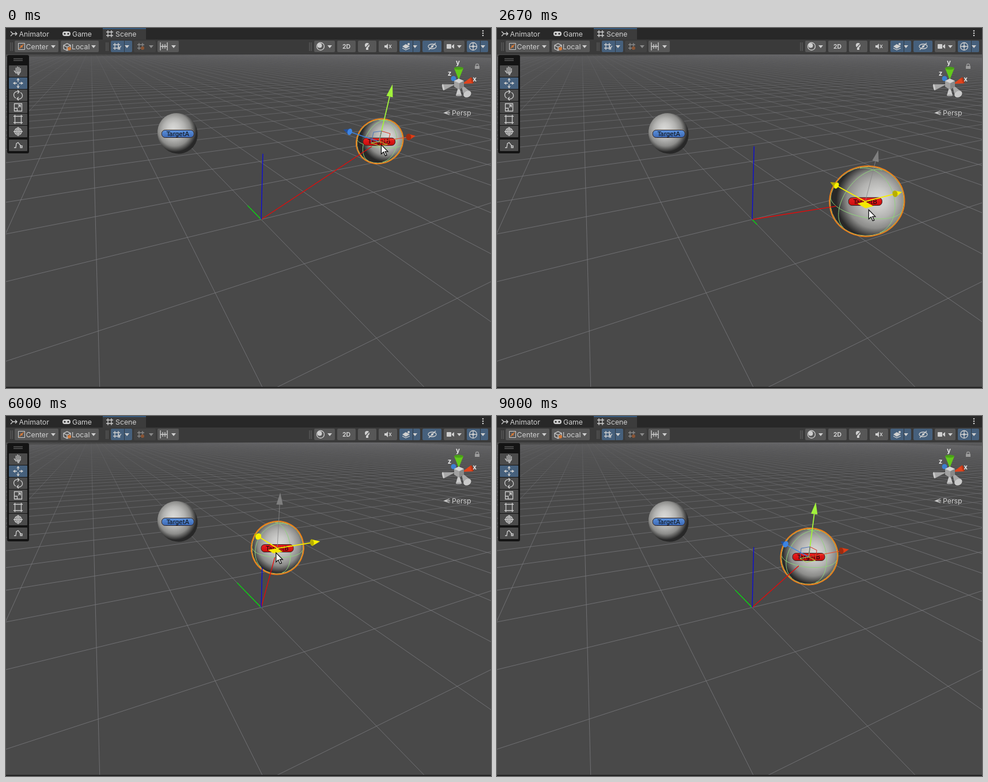
An HTML page with a canvas that plays this animation: 842x626 px, repeating every 9190 ms.

```html
<!DOCTYPE html>
<html lang="en">
<head>
<meta charset="utf-8">
<title>Scene view</title>
<style>
html, body { margin: 0; width: 100%; height: 100%; overflow: hidden; background: #494949; }
canvas { display: block; }
</style>
</head>
<body>
<canvas id="stage" width="842" height="626"></canvas>
<script>
const W = 842, H = 626, LOOP = 9190, STEP = 200 / 3, TAU = Math.PI * 2;
const INK = '#cfcfcf', DIM = '#8a8a8a', BTN = '#575757', ON = '#46607c';
const stage = document.getElementById('stage').getContext('2d');
let g = stage;

// ---------- drawing helpers ----------
function paint(fill, stroke, width = 1) {
  if (fill) { g.fillStyle = fill; g.fill(); }
  if (stroke) { g.strokeStyle = stroke; g.lineWidth = width; g.stroke(); }
}
function poly(pts, fill, stroke, width) {
  g.beginPath();
  pts.forEach(p => g.lineTo(...p));
  if (pts.length > 2) g.closePath();
  paint(fill, stroke, width);
}
const line = (a, b, color, width) => poly([a, b], null, color, width);
function box(x, y, w, h, fill, r = 0, stroke) {
  g.beginPath(); g.roundRect(x, y, w, h, r); paint(fill, stroke);
}
function oval(x, y, rx, ry, turn, fill, stroke, width) {
  g.beginPath(); g.ellipse(x, y, rx, ry, turn, 0, TAU); paint(fill, stroke, width);
}
const disc = (x, y, r, fill, stroke, width) => oval(x, y, r, r, 0, fill, stroke, width);
function text(s, x, y, color = INK, font = '12.3px Inter, sans-serif', align = 'left') {
  g.font = font; g.textAlign = align; g.fillStyle = color; g.fillText(s, x, y);
}
// path drawn around a centre
function icon(x, y, d, color = INK, solid = false) {
  g.save(); g.translate(x, y);
  const p = new Path2D(d);
  g.fillStyle = g.strokeStyle = color; g.lineWidth = 1.3;
  if (solid) g.fill(p); else g.stroke(p);
  g.restore();
}
// cone with the flat end at a and the point at b; open is the roundness of the visible base
function cone(a, b, r, side, base, open) {
  const turn = Math.atan2(b[1] - a[1], b[0] - a[0]), nx = -Math.sin(turn) * r, ny = Math.cos(turn) * r;
  poly([[a[0] + nx, a[1] + ny], b, [a[0] - nx, a[1] - ny]], side);
  if (open > 0) oval(a[0], a[1], r * open, r, turn, base);
}

// ---------- camera ----------
const CAM = [-1.54, 1.99, -2.9], MID = [421, 336], FOCAL = 502;
const depth = (x, y, z) => 1 + .095 * x - .134 * y + .202 * z;
function proj(x, y, z) {
  const w = depth(x, y, z);
  return [(443 + 157.9 * x - 56.5 * y + 29.8 * z) / w, (333 + 3.4 * x - 156 * y + 5.8 * z) / w];
}
// screen point to ground point
function ground(u, v) {
  const a = 157.9 - .095 * u, b = 29.8 - .202 * u, c = 3.4 - .095 * v, d = 5.8 - .202 * v;
  const e = u - 443, f = v - 333, det = a * d - b * c;
  return [(e * d - b * f) / det, (a * f - c * e) / det];
}

// ---------- motion: almost steady turns round an ellipse (ms, degrees, radius) ----------
const TURNS = [
  [600, 50, 1.62], [1470, 197, .77], [1933, 264.6, .81], [2400, 341, .98], [3600, 482, 1.12], [4270, 573.6, .98],
  [4933, 655.5, .99], [5200, 700, .98], [6000, 804.7, .937], [7070, 980.4, .946], [7533, 1048.4, .78], [8270, 1139.5, .917]
];
function slope(i, k) {
  const p = TURNS[i - 1], n = TURNS[i + 1];
  return p && n ? (n[k] - p[k]) / (n[0] - p[0]) : 0;
}
function position(time) {
  const last = TURNS.length - 1, t = Math.max(TURNS[0][0], Math.min(TURNS[last][0], time));
  let i = 0;
  while (i < last - 1 && t >= TURNS[i + 1][0]) i++;
  const a = TURNS[i], b = TURNS[i + 1], d = b[0] - a[0], s = (t - a[0]) / d;
  const [deg, r] = [1, 2].map(k =>
    a[k] * (1 + 2 * s) * (1 - s) ** 2 + b[k] * s * s * (3 - 2 * s) +
    d * s * (1 - s) * (slope(i, k) * (1 - s) - slope(i + 1, k) * s));
  const angle = deg * TAU / 360;
  return [455 + 185 * r * Math.cos(angle), 328 - 105 * r * Math.sin(angle)];
}

// ---------- scene objects ----------
function sphere(x, z, selected) {
  const w = depth(x, 0, z), [u, v] = proj(x, 0, z);
  const du = u - MID[0], dv = v - MID[1], k = .13 / w;
  const cx = u + du * k * k, cy = v + dv * k * k, turn = Math.atan2(dv, du);
  const r = 67 / w, long = r * (1 + .35 * (du * du + dv * dv) / FOCAL ** 2);
  const lit = g.createRadialGradient(u + du * k, v + dv * k, 0, u + du * k * .6, v + dv * k * .6, r * 1.1);
  ['#d8d8d6', '#cbcbc9', '#b3b3b1', '#8c8c8a', '#282828'].forEach((c, i) => lit.addColorStop(i / 4, c));
  oval(cx, cy, long, r, turn, lit);
  if (selected) {
    wires(x, z);
    oval(cx, cy, long, r, turn, null, '#b4c46c');
    oval(cx, cy, long + 1.2, r + 1.2, turn, null, '#f08018', 1.9);
  }
}
function wires(x, z) {
  const toCam = [CAM[0] - x, CAM[1], CAM[2] - z];
  for (let axis = 0; axis < 3; axis++) {
    let down = false;
    g.beginPath();
    for (let i = 0; i <= 90; i++) {
      const a = i * TAU / 90, p = [0, 0, 0];
      p[(axis + 1) % 3] = .5 * Math.cos(a);
      p[(axis + 2) % 3] = .5 * Math.sin(a);
      const front = p[0] * toCam[0] + p[1] * toCam[1] + p[2] * toCam[2] > .25;
      const q = proj(x + p[0], p[1], z + p[2]);
      if (front && down) g.lineTo(...q); else g.moveTo(...q);
      down = front;
    }
    paint(null, '#8fd47c');
  }
}
function label(name, x, z, top, bottom) {
  const [u, v] = proj(x, 0, z), w = Math.max(56, 65 / depth(x, 0, z)), h = w / 3 - 5.7;
  const fill = g.createLinearGradient(0, v - h / 2, 0, v + h / 2);
  fill.addColorStop(0, top); fill.addColorStop(1, bottom);
  box(u - w / 2, v - h / 2, w, h, fill, Math.min(6, h / 2), '#2c2020');
  const size = w * .245 - 3.3;
  text(name, u, v + size * .36, '#0a0a0a', size + 'px "DejaVu Sans", sans-serif', 'center');
}
function vectors(x, z) {
  const len = Math.hypot(x, z), end = Math.max(0, 1 - .5 / len), o = proj(0, 0, 0);
  line(o, proj(x * end, 0, z * end), '#e80808', 1.3);
  line(o, proj(0, 0, z / len), '#00e408', 1.3);
  line(o, proj(0, x / len, 0), '#0808e0', 1.3);
}
function arrow(x, z, axis, color, side, base, width) {
  const size = depth(x, 0, z) * .7, from = [x, 0, z];
  const at = s => from.map((c, i) => c + axis[i] * size * s);
  const a = at(.8), view = a.map((c, i) => c - CAM[i]);
  const open = view.reduce((sum, c, i) => sum + c * axis[i], 0) / Math.hypot(...view);
  line(proj(...from), proj(...a), color, width);
  cone(proj(...a), proj(...at(1)), 5.7, side, base, open);
}
function handles(x, z, mode) {
  const drag = mode === 'drag', s = depth(x, 0, z) * .14, gray = 'rgba(136,136,136,.85)';
  const quad = (p, q) => [[0, 0], [1, 0], [1, 1], [0, 1]].map(([i, j]) =>
    proj(x + s * (i * p[0] + j * q[0]), s * (i * p[1] + j * q[1]), z + s * (i * p[2] + j * q[2])));
  const left = [-1, 0, 0], up = [0, 1, 0], near = [0, 0, -1];
  if (drag) {
    arrow(x, z, [0, 1, 0], gray, gray, gray, 1);
    arrow(x, z, [0, 0, 1], '#f8f000', '#b8ae00', '#f8f000', 1.8);
    arrow(x, z, [1, 0, 0], '#f8f000', '#f8f000', '#b8ae00', 1.8);
  } else {
    arrow(x, z, [0, 0, 1], '#3d84e2', '#24509a', '#3d84e2', 1.4);
    arrow(x, z, [1, 0, 0], '#e8502c', '#e03c14', '#9c2c10', 1.2);
    arrow(x, z, [0, 1, 0], '#a2f23c', '#a2f23c', '#70b020', 1.8);
    poly(quad(near, up), null, '#d8321c');
    poly(quad(left, up), null, '#4a74b8');
  }
  if (mode === 'idle') poly(quad(left, near), null, '#a8d838');
  else poly(quad(left, near), '#f5e800');
}
function pointer(x, y) {
  const arrowhead = 'M0 0V16L4 12.5 7 19 9.6 18 6.6 11.7H11.5Z';
  icon(x, y, arrowhead, '#fff', true);
  icon(x, y, arrowhead, '#111');
}

// ---------- fixed picture ----------
function floorGrid() {
  const fade = g.createLinearGradient(0, 40, 0, 300);
  ['.08', '.4', '.55', '.7', '.75'].forEach((a, i) => fade.addColorStop(i / 4, `rgba(124,124,128,${a})`));
  for (let i = -70; i <= 70; i++) {
    line(proj(i, 0, (-.8 - .095 * i) / .202), proj(i, 0, 400), fade);
    line(proj((-.8 - .202 * i) / .095, 0, i), proj(800, 0, i), fade);
  }
}
const caret = (x, color = INK) => icon(x, 32, 'M-4-2H4L0 3Z', color, true);
const HASH = 'M-3-6V6M3-6V6M-6-3H6M-6 3H6';

function button(x, w, color, menu) {
  box(x, 22, w, 20, color, 2);
  if (menu) caret(x + w - 9);
}
function topBars() {
  box(0, 0, W, 20, '#282828');
  box(0, 20, W, 26, '#3a3a3a');
  box(168, 0, 75, 20, '#3c3c3c');
  box(168, 0, 75, 2, '#35587c');
  icon(13, 10, 'M-5-4L-1 0H5M-5 4L-1 0M3-3L6 0 3 3');
  text('Animator', 22.5, 15);
  box(98, 6, 14, 8, INK, 4);
  disc(102, 10, 1.6, '#282828'); disc(108, 10, 1.6, '#282828');
  text('Game', 115, 15);
  icon(180, 10, HASH);
  text('Scene', 190, 15);
  for (let y = 5; y < 14; y += 4) disc(828, y, 1.3, INK);
  [9, 175, 528].forEach(x => icon(x, 32, 'M-1-7V8M2-7V8', '#5c5c5c'));

  button(15, 76, BTN, true);
  box(21.5, 26.5, 11, 11, null, 0, INK); icon(27, 32, 'M-4 4L4-4', '#d07838'); disc(27, 32, 2, '#d07838');
  text('Center', 34.5, 36.5);
  button(95, 66, BTN, true);
  icon(106, 33, 'M-6-3L0-6 6-3V3L0 6-6 3ZM-6-3L0 0 6-3M0 0V6'); disc(110, 36, 3, '#d07838');
  text('Local', 114, 36.5);
  button(182, 37, ON, true); icon(192, 32, HASH); text('Y', 194, 38, INK, 'bold 9px Inter, sans-serif');
  button(222, 38, '#434343'); caret(252, DIM); icon(234, 32, HASH, DIM); disc(237, 35, 3, '#8a5434');
  button(263, 37, BTN, true); icon(274, 32, 'M-6-7V7M-2-4V4M2-4V4M6-7V7M-6 0H6');

  button(535, 36, BTN, true); disc(546, 32, 6.5, null, INK, 1.3); disc(544.5, 30.5, 4, INK);
  button(575, 32, BTN); text('2D', 591, 36, INK, 'bold 10.5px Inter, sans-serif', 'center');
  button(611, 32, BTN); disc(627, 30, 4, INK); box(625, 34, 4, 4, INK); icon(627, 32, 'M-5 5L5-6', BTN);
  button(647, 32, BTN); icon(661, 32, 'M-4-2H-1L2-5V5L-1 2H-4Z', INK, true); icon(667, 32, 'M-2-3L2 3M2-3L-2 3');
  button(683, 36, ON, true); icon(694, 32, 'M-6 0L0-4 7 0 0 4Z', INK, true); icon(694, 36, 'M-6-1L0 2 7-1'); disc(699, 28, 2, INK);
  button(723, 33, ON); oval(740, 32, 7, 4, 0, null, INK, 1.3); disc(740, 32, 2, INK); icon(740, 32, 'M-6 6L6-6');
  button(760, 36, BTN, true); box(765, 28, 8, 8, INK, 1); icon(776, 32, 'M-2-1L2-4V4L-2 1Z', INK, true);
  button(800, 37, ON, true); disc(811, 32, 6.5, null, INK, 1.3); icon(811, 32, 'M-7 0H7M0-7V7'); disc(811, 32, 2, INK);
  [205, 706, 823].forEach(x => line([x + .5, 22], [x + .5, 42], '#303a44'));
}
function palette() {
  box(2, 47, 38, 171, '#141414', 3);
  icon(21, 55, 'M-8-1.5H8M-8 1.5H8', '#585858');
  const tools = [
    'M-3.5 1V-6M-1 1V-8M1.5 1V-7M4 2V-5M-3 4L-7-1M-3 2H4M-2 4H3M-1 6H2',
    'M-8 0H-2M2 0H8M0-8V-2M0 2V8M-5-2L-8 0-5 2M5-2L8 0 5 2M-2-5L0-8 2-5M-2 5L0 8 2 5',
    'M-4 5A6 6 0 0 1 1-6M-1-9L2-6-1-3M4-5A6 6 0 0 1-1 6M1 3L-2 6 1 9',
    'M-6.5-6.5H6.5V6.5H-6.5ZM-6 1.5H-1.5V6M0 0L4-4M0-4H4V0',
    'M-5.5-5.5H5.5V5.5H-5.5ZM-8-5.5H-5.5V-8M8-5.5H5.5V-8M-8 5.5H-5.5V8M8 5.5H5.5V8',
    'M-8 0H8M0-8V8M-6 0A6 6 0 0 1 6 0A6 6 0 0 1-6 0M-3-3H3V3H-3Z',
    'M-7 4H-4L-3-3 0-5 4 0V4H7V1H3'
  ];
  tools.forEach((d, i) => {
    const y = 65 + 21 * i + (i > 5 ? 3 : 0);
    box(5, y, 32, 20, i === 1 ? ON : '#4b4b4b', 1);
    icon(21, y + 10, d);
  });
}
function viewCube() {
  const bold = 'bold 11.5px Inter, sans-serif', light = '#cacaca', mid = '#a8a8a8';
  cone([759, 103], [780, 98], 5.5, mid, light, .3);
  disc(777, 88, 4.5, '#3c80d0');
  cone([786, 70], [786, 90], 8, '#62c81c', '#4aa018', .3);
  cone([809, 91], [792, 97], 5.5, '#e0431c', '#b83414', .3);
  cone([786, 117], [786, 100], 5, light, mid, .3);
  cone([801, 115], [790, 98], 7, mid, light, .75);
  icon(786, 97, 'M-8-5L0-9 9-5V5L0 10-8 5Z', '#a2a2a2', true);
  icon(786, 97, 'M-8-5L0-9 9-5 1-1Z', '#d4d4d4', true);
  icon(786, 97, 'M1-1L9-5V5L1 10Z', '#888', true);
  text('y', 784.5, 64, '#e4e4e4', bold, 'center');
  text('z', 770, 83, '#e4e4e4', bold, 'center');
  text('x', 813.5, 93, '#e4e4e4', bold, 'center');
  box(814, 66, 8, 5, '#9c9c9c'); icon(818, 66, 'M-2.5 0V-1A2.5 2.5 0 0 1 2.5-1V0', '#9c9c9c');
  icon(766, 147.5, 'M4-3.5L-5 0 4 3.5M-5 0H5');
  text('Persp', 774, 152);
}

const back = document.createElement('canvas');
back.width = W; back.height = H;
g = back.getContext('2d');
box(0, 0, W, H, '#494949');
floorGrid();
topBars();
sphere(0, 4.75);
label('TargetA', 0, 4.75, '#5c92dc', '#3c68b4');
palette();
viewCube();
box(0, 624, W, 2, '#222');
g = stage;

// ---------- playback ----------
const GRAB = 130, DRAG = 590, DROP = 8280, LEAVE = 8990;
function draw(now) {
  const t = Math.floor((now % LOOP + 5) / STEP) * STEP;
  const [x, z] = ground(...position(t)), behind = depth(x, 0, z) > 1;
  g.drawImage(back, 0, 0);
  if (!behind) vectors(x, z);
  sphere(x, z, true);
  if (behind) vectors(x, z);
  label('TargetB', x, z, '#ec2020', '#c80c0c');
  handles(x, z, t < GRAB || t > DROP ? 'idle' : t < DRAG ? 'hover' : 'drag');
  if (t < LEAVE) {
    const [u, v] = proj(x - .15, 0, z - .21), s = Math.max(0, Math.min(1, (t - DROP) / 650)), e = s * s * (3 - 2 * s);
    pointer(u + (766 - u) * e, v + (617 - v) * e);
  }
}
const start = performance.now();
function tick() {
  draw(performance.now() - start);
  requestAnimationFrame(tick);
}
tick();
</script>
</body>
</html>
```
